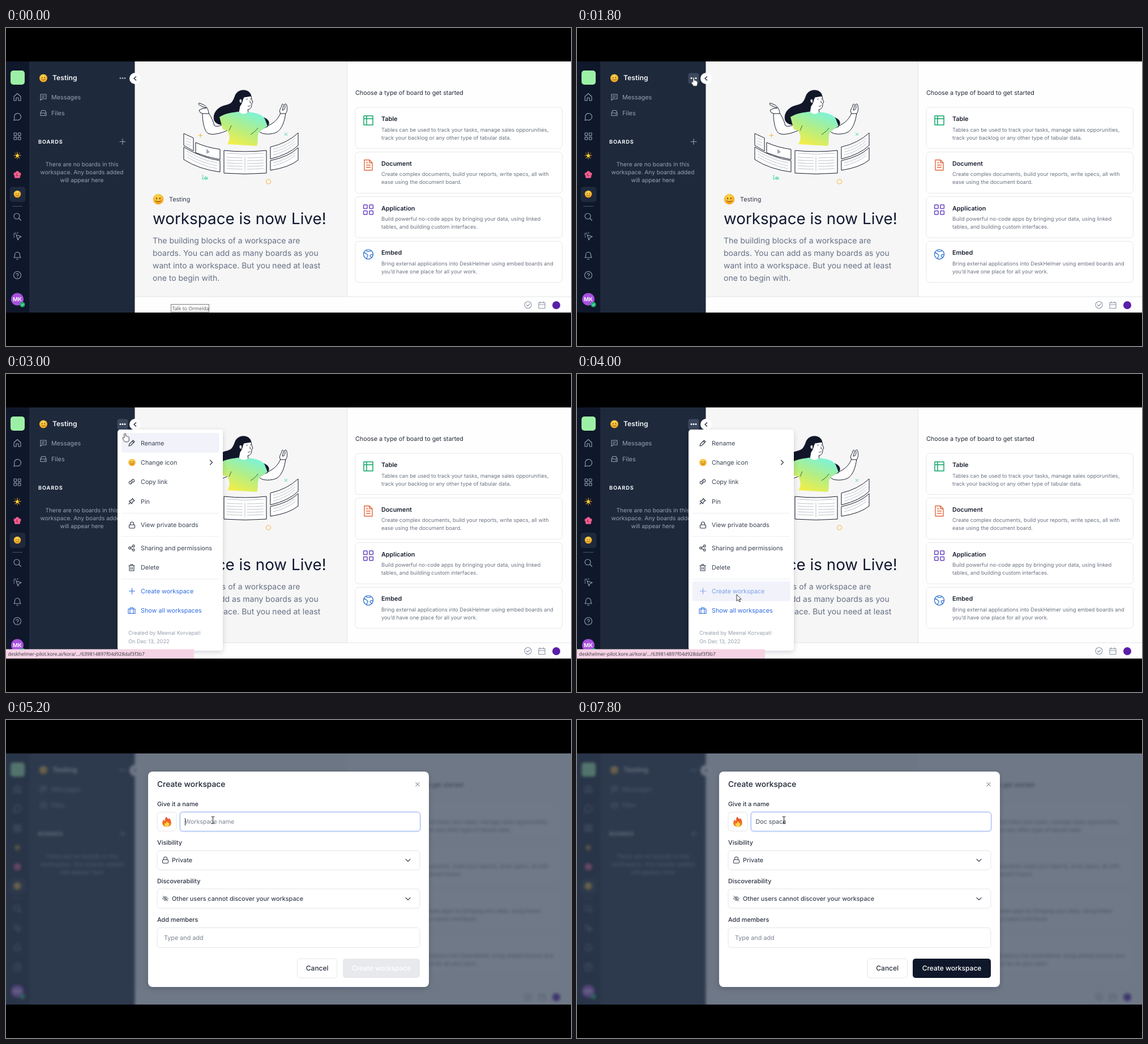
These frames come from a looping animation (998 px wide and 561 px high, 8000 ms). An HTML page:

```html
<!DOCTYPE html>
<html lang="en">
<head>
<meta charset="utf-8">
<title>Create a workspace</title>
<style>
html, body { margin: 0; width: 100%; height: 100%; overflow: hidden; background: #000; }
svg.stage { display: block; width: 100%; height: 100%; }
text { font-family: Inter, sans-serif; font-size: 10.8px; text-rendering: geometricPrecision; white-space: pre; }
.line { fill: none; stroke: currentColor; stroke-width: 1.1; stroke-linecap: round; stroke-linejoin: round; }
.solid { fill: currentColor; }
.ink { fill: #fff; stroke: #151a2b; stroke-width: 1; stroke-linejoin: round; }
.small { font-size: 9.3px; fill: #6b7280; }
.strong { font-weight: 600; fill: #1a2030; }
.lead { font-size: 14px; fill: #667085; }
.mid { text-anchor: middle; }
.system { font-family: "Open Sans", sans-serif; }
.field { fill: #fff; stroke: #e3e5e9; }

/* everything runs on one 8 s clock; 2.5% is one 200 ms step */
.tip, .dots, .menu, .hover, .pressed, .status, .page, .shade, .modal, .arrow, .hand, .beam,
.hint, .typed, .caret, .off, .on { animation: 8s step-end infinite; }
.tip { animation-name: tip; }
.dots { animation-name: dots; }
.menu { animation-name: menu; }
.hover { animation-name: hover; }
.pressed { animation-name: pressed; }
.status { animation-name: status; }
.page { animation-name: page; }
.shade, .modal, .beam { animation-name: modal; }
.pop { animation: pop 8s infinite; transform-origin: 499px 281px; }
.arrow { animation-name: arrow; }
.hand { animation-name: hand; }
.hint, .off { animation-name: before; }
.on { animation-name: after; }
.typed { animation-name: typed; }
.caret { animation-name: blink; }
.pointer { animation: pointer 8s infinite; }

@keyframes tip { 0% { opacity: 1 } 2.5%, 100% { opacity: 0 } }
@keyframes dots { 0% { opacity: 0 } 17.5% { opacity: 1 } 52.5%, 100% { opacity: 0 } }
@keyframes menu { 0% { opacity: 0 } 25% { opacity: 1 } 52.5%, 100% { opacity: 0 } }
@keyframes status { 0% { opacity: 0 } 25% { opacity: 1 } 55%, 100% { opacity: 0 } }
@keyframes modal { 0% { opacity: 0 } 52.5%, 100% { opacity: 1 } }
@keyframes page { 0% { filter: none } 52.5%, 100% { filter: blur(2.4px) } }
@keyframes pressed { 0% { opacity: 1 } 50% { opacity: .6 } 52.5%, 100% { opacity: 1 } }
@keyframes before { 0% { opacity: 1 } 72.5%, 100% { opacity: 0 } }
@keyframes after { 0% { opacity: 0 } 72.5%, 100% { opacity: 1 } }
@keyframes arrow { 0% { opacity: 0 } 2.5% { opacity: 1 } 17.5% { opacity: 0 } 50% { opacity: 1 } 52.5%, 100% { opacity: 0 } }
@keyframes hand { 0% { opacity: 0 } 17.5% { opacity: 1 } 50%, 100% { opacity: 0 } }
@keyframes blink { 0% { opacity: 1 } 70% { opacity: 0 } 72.5% { opacity: 1 } 97.5%, 100% { opacity: 0 } }
@keyframes hover {
  0% { transform: none } 40% { transform: translateY(34.5px) } 42.5% { transform: translateY(103px) }
  45% { transform: translateY(186px) } 47.5%, 100% { transform: translateY(262px) }
}
@keyframes typed {
  0% { transform: none } 72.5% { transform: translateX(7.8px) } 75% { transform: translateX(14.3px) }
  77.5% { transform: translateX(20.4px) } 80% { transform: translateX(23.4px) }
  85% { transform: translateX(29px) } 87.5% { transform: translateX(35.6px) }
  90% { transform: translateX(47.7px) } 92.5%, 100% { transform: translateX(54.2px) }
}
@keyframes pop {
  0%, 52.5% { transform: scale(.992); opacity: .975; animation-timing-function: ease-out }
  55%, 100% { transform: none; opacity: 1 }
}
@keyframes pointer {
  0%, 2.5% { transform: translate(300px, 494px); animation-timing-function: ease-out }
  15%, 35% { transform: translate(206px, 87.5px); animation-timing-function: ease-in-out }
  50%, 52.5% { transform: translate(282px, 389px); animation-timing-function: ease-in-out }
  65%, 100% { transform: translate(365.5px, 176.5px) }
}
</style>
</head>
<body>
<svg class="stage" viewBox="0 0 998 561">
<defs>
  <radialGradient id="gold" cx=".45" cy=".3" r=".75"><stop stop-color="#ffdc50"/><stop offset="1" stop-color="#f39b19"/></radialGradient>
  <linearGradient id="shirt" x1=".2" y1="1" x2=".75" y2="0"><stop offset=".05" stop-color="#f6ee45"/><stop offset=".5" stop-color="#b4ee83"/><stop offset="1" stop-color="#7af3dc"/></linearGradient>
  <linearGradient id="fire" x2="0" y2="1"><stop stop-color="#e8452c"/><stop offset="1" stop-color="#f98a1d"/></linearGradient>
  <filter id="soft" x="-20%" y="-20%" width="140%" height="140%"><feDropShadow dx="0" dy="3" stdDeviation="5" flood-color="#101828" flood-opacity=".16"/></filter>
  <g id="smile">
    <circle r="7" fill="url(#gold)"/>
    <g fill="#6b4413"><ellipse cx="-2.1" cy="-1.1" rx=".8" ry="1.2"/><ellipse cx="2.1" cy="-1.1" rx=".8" ry="1.2"/></g>
    <path d="M-3.2 2.300Q0 4.700 3.200 2.300" fill="none" stroke="#6b4413" stroke-width=".8" stroke-linecap="round"/>
  </g>
  <g id="grid" class="line">
    <rect x="-6" y="-6" width="4.6" height="4.6" rx=".6"/><rect x="1.4" y="-6" width="4.6" height="4.6" rx=".6"/>
    <rect x="-6" y="1.4" width="4.6" height="4.6" rx=".6"/><rect x="1.4" y="1.4" width="4.6" height="4.6" rx=".6"/>
  </g>
  <g id="lock" class="line"><rect x="-5" y="-1" width="10" height="6" rx="1.4"/><path d="M-3-1V-3A3 3 0 0 1 3-3V-1"/></g>
  <path id="chevron" class="line" d="M-4-2L0 2L4-2"/>
  <path id="plus" class="line" d="M-5 0H5M0-5V5"/>
  <rect id="card" x="617" y="140" width="365.5" height="72.5" rx="6" fill="#fff" stroke="#e7e8eb"/>
</defs>

<g class="page">
  <rect x="-20" y="40" width="61" height="490" fill="#0f172a"/>
  <rect x="41" y="40" width="187" height="490" fill="#1e293b"/>
  <rect x="227.500" y="40" width="375.500" height="434" fill="#f6f6f6"/>
  <rect x="603" y="40" width="420" height="434" fill="#fefefe"/>
  <rect x="227.500" y="474" width="800" height="60" fill="#fefefe"/>
  <path d="M602.5 40V474M228 474H1020" stroke="#e2e4e8" fill="none"/>

  <!-- rail -->
  <rect x="8" y="75" width="25" height="25" rx="5" fill="#9cf0a5"/>
  <rect x="6.500" y="280" width="28" height="27" rx="5" fill="#1e293b"/>
  <path d="M11 314.500H29" stroke="#475569"/>
  <g color="#94a3b8">
    <path class="line" transform="translate(20 122)" d="M-6-1L0-6.500L6-1V6H2V1H-2V6H-6Z"/>
    <path class="line" transform="translate(20 157)" d="M-6 6L-5 2A6 6 0 1 1-2 5Z"/>
    <use href="#grid" x="20" y="191"/>
    <path class="line" transform="translate(20 333)" d="M-6-1A5 5 0 1 1 4-1A5 5 0 1 1-6-1M3 3L6.500 6.500"/>
    <path class="line" transform="translate(20 367)" d="M-2-2L7 1L3 3L1 7ZM-3-6V-4M-7-2H-5M-6-5L-5-4M0-5L1-6M-6 2L-5 1"/>
    <path class="line" transform="translate(20 402)" d="M-6 3C-4 1-4.500-1-4.500-2A4.500 4.500 0 0 1 4.500-2C4.500-1 4 1 6 3ZM-1.500 6H1.500"/>
    <g transform="translate(20 436)"><circle class="line" r="6.500"/><path class="line" d="M-2-1.500A2 2 0 1 1 0 1V1.300M0 3.600V3.700"/></g>
  </g>
  <g transform="translate(20 225)"><path d="M0-4.500L1.300-1.500L4.500-1.200L2 1L3 4.200L0 2.500L-3 4.200L-2 1L-4.500-1.200L-1.300-1.500Z" fill="#ffd02a"/><path d="M0-6.500V-4M0 4V6.500M-6.500 0H-4M4 0H6.500M-4.500-5L-3-3.300M4.500-5L3-3.300M-4.500 5L-3 3.300M4.500 5L3 3.300" stroke="#f5a623"/></g>
  <g transform="translate(20 259)" fill="#ee5a92">
    <circle cy="-3.700" r="3"/><circle cx="3.500" cy="-1.200" r="3"/><circle cx="2.200" cy="3" r="3"/><circle cx="-2.200" cy="3" r="3"/><circle cx="-3.500" cy="-1.200" r="3"/>
    <circle r="2" fill="#a7264c"/><circle cx="1" cy="-.5" r="1" fill="#ffd34d"/>
  </g>
  <use href="#smile" transform="translate(20 293) scale(.9)"/>
  <circle cx="20" cy="478.500" r="11" fill="#a750dc"/>
  <text x="20" y="482" class="mid" font-weight="600" style="font-size:9.800px" fill="#fff">MK</text>
  <circle cx="29" cy="488" r="4.600" fill="#17b26a"/>
  <path d="M27 488L28.500 489.500L31 486.700" fill="none" stroke="#fff"/>

  <!-- side panel -->
  <use href="#smile" x="66" y="88.500"/>
  <text x="82" y="92.300" font-weight="600" style="font-size:12.200px" fill="#f4f6f9">Testing</text>
  <g color="#94a3b8">
    <g transform="translate(206 88.500)" class="solid"><circle cx="-4" r="1.500"/><circle r="1.500"/><circle cx="4" r="1.500"/></g>
    <path class="line" transform="translate(66 122)" d="M-5-5H5V3H-2L-5 5.500ZM-2.500-2H2.500M-2.500.5H1"/>
    <path class="line" transform="translate(66 150)" d="M-5 0L-3-4.500H3L5 0V4.500H-5ZM-5 0H5M2 2.300H3"/>
    <use href="#plus" x="206" y="200.500"/>
    <g class="solid">
      <text x="80" y="125.500">Messages</text><text x="80" y="153.700">Files</text>
      <g class="mid"><text x="134" y="243.700" style="font-size:10.200px">There are no boards in this</text><text x="134" y="257.700" style="font-size:10.200px">workspace. Any boards added</text><text x="134" y="271.700" style="font-size:10.200px">will appear here</text></g>
    </g>
  </g>
  <text x="57" y="204" font-weight="700" letter-spacing=".9" style="font-size:9.200px" fill="#f1f4f8">BOARDS</text>
  <g class="dots">
    <rect x="196.500" y="79.500" width="19" height="19" rx="4" fill="#3b475c"/>
    <g transform="translate(206 88.500)" fill="#fff"><circle cx="-4" r="1.500"/><circle r="1.500"/><circle cx="4" r="1.500"/></g>
  </g>
  <circle cx="228" cy="89" r="10" fill="#fff"/>
  <path d="M230 85.500L226 89L230 92.500" fill="none" stroke="#1a2030" stroke-width="1.300"/>

  <!-- illustration -->
  <g class="ink">
    <path d="M314 186L331 194V217L314 207ZM335 202Q355 211 378 214V232Q355 228 335 220ZM314 210Q345 229 378 234V254Q340 249 314 232Z"/>
    <path d="M467 210Q497 203 516 185V207Q500 223 467 231ZM467 234Q500 227 516 211V233Q500 246 467 251Z"/>
    <path d="M347 150C347 165 350 182 357 186C366 190 382 185 392 180L384 170C377 174 370 174 368 172C366 164 362 156 358 150"/>
    <path d="M358 151C358 145 355 139 350 136L342 132.500Q339 132 341 135.500L348 139L354 141L347 142L341 145Q342 150 347 151Z"/>
    <path d="M485 150C481 160 474 168 461 173L447 182C452 189 470 188 478 184C488 178 492 164 494 150"/>
    <path d="M485 151C481 145 486 142 487 137C487 133 491 133 490 138L488 145C493 145 494 139 492 135Q495 132 496 137C497 142 497 147 494 151Z"/>
    <path d="M433 121C432 107 410 106 405 119C400 133 397 134 386 137C371 141 365 153 368 163C373 173 388 172 396 164C404 158 411 154 414 146L421 122Z" fill="#111629"/>
    <path d="M420 122C417 128 417 134 413 138L411 149Q420 157 428 149L427 144C433 143 434 139 434 133L436 131L434 126L433 120Z"/>
    <path d="M416 126Q412 124 412 129Q413 133 416 132" stroke-width=".8"/>
    <path d="M424 126L427 125M431 125L433 125M427 138Q430 139 432 136M431 128V132L433 132" fill="none" stroke-width=".8"/>
    <path d="M455 158C463 161 467 166 462 174L454 177Z" fill="#111629"/>
    <path d="M377 157C388 150 401 149 411 147.500Q419 155 428 148.500C440 149 452 152 457 160L462 173L448 182C442 190 447 199 443 208L391 205C397 196 395 187 390 180L383 179Z" fill="url(#shirt)" stroke="none"/>
    <path d="M432 188C438 184 443 180 445 176M394 181L398 172" fill="none" stroke-width=".7"/>
    <path d="M385 216Q422 220 460 216V256Q422 259 385 256Z"/>
  </g>
  <g fill="none" stroke="#a9adb6" stroke-width=".75">
    <path d="M390 221Q422 224 455 221M422 227V252M390 228Q405 229 418 229M390 233Q405 234 418 234M390 238Q405 239 418 239M390 243Q405 244 418 244M390 248Q405 249 418 249M426 229Q440 229 455 228M426 234Q440 234 455 233M426 239Q440 239 455 238M426 244Q440 244 455 243M426 249Q440 249 455 248"/>
    <path d="M319 217Q344 233 373 238M319 222Q344 238 373 243M319 227Q344 243 373 248M318 194L327 198M318 199L327 203M318 204L327 208"/>
    <path d="M472 214Q496 208 511 194M472 219Q496 213 511 199M472 224Q496 218 511 204M472 238Q496 232 511 220M472 243Q496 237 511 225"/>
  </g>
  <path d="M354 213L360 219L354 222Z" fill="#a5a8af"/>
  <g fill="none" stroke="#f6b545" stroke-width="1.100"><path d="M340 189.500H347M343.500 186V193"/><circle cx="463.500" cy="271" r="4"/></g>
  <path d="M492 185L497 190M497 185L492 190M346 260Q350 259 347 264Q346 269 350 266Q354 259 351 266Q354 269 356 264Q353 261 353 266H357" fill="none" stroke="#35d3a3" stroke-width="1"/>

  <use href="#smile" transform="translate(269 302) scale(1.330)"/>
  <text x="288" y="305.700" fill="#30384a">Testing</text>
  <text x="259" y="346" style="font-size:27.800px" fill="#111830">workspace is now Live!</text>
  <text class="lead" x="259" y="380">The building blocks of a workspace are</text>
  <text class="lead" x="259" y="402">boards. You can add as many boards as you</text>
  <text class="lead" x="259" y="423.700">want into a workspace. But you need at least</text>
  <text class="lead" x="259" y="445.500">one to begin with.</text>

  <!-- board types -->
  <text x="617" y="118" style="font-size:10.750px" fill="#242a38">Choose a type of board to get started</text>
  <g>
    <use href="#card"/>
    <path class="line" color="#12a66a" style="stroke-width:1.500" transform="translate(640 163)" d="M-8-8H8V8H-8ZM-8-3H8M-3-8V8"/>
    <text class="strong" x="663" y="164">Table</text>
    <text class="small" x="663" y="182.500">Tables can be used to track your tasks, manage sales opporunities,</text>
    <text class="small" x="663" y="196.500">track your backlog or any other type of tabular data.</text>
  </g>
  <g transform="translate(0 78.800)">
    <use href="#card"/>
    <path class="line" color="#e2683c" style="stroke-width:1.400" transform="translate(640 163)" d="M-7-9H2L7-4V9H-7ZM2-9V-4H7M-3.500 0H3.500M-3.500 4H3.500M-3.500-4H-1"/>
    <text class="strong" x="663" y="164">Document</text>
    <text class="small" x="663" y="182.500">Create complex documents, build your reports, write specs, all with</text>
    <text class="small" x="663" y="196.500">ease using the document board.</text>
  </g>
  <g transform="translate(0 157.500)">
    <use href="#card"/>
    <use href="#grid" color="#6b46c1" transform="translate(640 163) scale(1.400)"/>
    <text class="strong" x="663" y="164">Application</text>
    <text class="small" x="663" y="182.500">Build powerful no-code apps by bringing your data, using linked</text>
    <text class="small" x="663" y="196.500">tables, and building custom interfaces.</text>
  </g>
  <g transform="translate(0 236.300)">
    <use href="#card"/>
    <g color="#3174cf" transform="translate(640 163)"><circle class="line" r="8.500" style="stroke-width:1.300"/><path class="line" style="stroke-width:1.300" d="M-8-2.500C-3-3-4 0-1 1C0 3-3 4-3 8M-4-7C-2-3 2-5 5-6.500M8.500 1C4-1 2 2 4 4L6 6"/></g>
    <text class="strong" x="663" y="164">Embed</text>
    <text class="small" x="663" y="182.500">Bring external applications into DeskHelmer using embed boards and</text>
    <text class="small" x="663" y="196.500">you’d have one place for all your work.</text>
  </g>
  <g color="#8a93a5">
    <g transform="translate(922 488.500)"><circle class="line" r="6"/><path class="line" d="M-2.500 0L-.5 2L3-1.700"/></g>
    <path class="line" transform="translate(946.500 489)" d="M-5.500-4.500H5.500V5.500H-5.500ZM-5.500-1H5.500M-3-6.500V-4M3-6.500V-4"/>
  </g>
  <circle cx="972" cy="489" r="7" fill="#5a1fa8"/>
</g>

<g class="tip">
  <rect x="291.500" y="487.500" width="67" height="13.500" fill="#fff" stroke="#7b7b7b"/>
  <text class="system" x="293.500" y="497.500" style="font-size:8.800px" fill="#555">Talk to Ormelda</text>
</g>

<g class="menu">
  <rect x="197" y="98" width="186" height="390" rx="5" fill="#fff" filter="url(#soft)"/>
  <rect class="hover" x="204" y="104" width="172.500" height="34.500" rx="3" fill="#f1f2fa"/>
  <path d="M204 245.500H376M204 286.500H376M204 361.500H376" stroke="#eceef1"/>
  <g color="#2b3344">
    <path class="line" transform="translate(222 122)" d="M-5 5L-4 1.500L2.500-5L5-2.500L-1.500 4ZM1-3.500L3.500-1"/>
    <use href="#smile" transform="translate(222.500 156) scale(.9)"/>
    <use href="#chevron" transform="translate(362.500 156) rotate(-90)"/>
    <path class="line" transform="translate(222 190)" d="M-1 1.500A2.500 2.500 0 0 1-1-1.500L1.500-4A2.500 2.500 0 0 1 4.500-.5L3 1M1-1.500A2.500 2.500 0 0 1 1 1.500L-1.500 4A2.500 2.500 0 0 1-4.500.5L-3-1"/>
    <path class="line" transform="translate(222 224.500)" d="M1-5L5-1L3.500-.5L1 2L.5 4.500L-4.500-.5L-2-1L.5-3.500ZM-2 2L-5 5"/>
    <use href="#lock" x="222.500" y="267"/>
    <g transform="translate(222 307)" class="line"><circle cx="-3.500" r="1.900"/><circle cx="3.300" cy="-3.500" r="1.900"/><circle cx="3.300" cy="3.500" r="1.900"/><path d="M-1.800-1L1.700-2.700M-1.800 1L1.700 2.700"/></g>
    <path class="line" transform="translate(222 341.500)" d="M-5-3.500H5M-4-3.500V5.500H4V-3.500M-1.800-3.500V-5.500H1.800V-3.500M-1.300-.5V3M1.300-.5V3"/>
    <g fill="#3b4354">
      <text x="238" y="125.500">Rename</text><text x="238" y="160">Change icon</text><text x="238" y="194">Copy link</text>
      <text x="238" y="228.500">Pin</text><text x="238" y="270">View private boards</text>
      <text x="238" y="311">Sharing and permissions</text><text x="238" y="345.300">Delete</text>
    </g>
  </g>
  <g color="#2e6be0">
    <g class="pressed"><use href="#plus" x="222.500" y="383"/><text class="solid" x="238" y="387">Create workspace</text></g>
    <path class="line" transform="translate(222 417.500)" d="M-6-3H6V5H-6ZM-3-3V5M3-3V5M-2.500-3V-5.500H2.500V-3"/>
    <text class="solid" x="238" y="421.300">Show all workspaces</text>
  </g>
  <g fill="#98a0ae"><text x="216" y="459.500" style="font-size:9.300px">Created by Meenal Korvapati</text><text x="216" y="475" style="font-size:9.300px">On Dec 13, 2022</text></g>
</g>

<rect class="shade" y="59" width="998" height="443" fill="#344054" fill-opacity=".7"/>

<g class="modal"><g class="pop">
  <rect x="251" y="91" width="496" height="380" rx="8" fill="#fff" filter="url(#soft)"/>
  <text x="267" y="118.300" style="font-size:13.800px" font-weight="500" fill="#1d2433">Create workspace</text>
  <path d="M723.500 110L730.500 117M730.500 110L723.500 117" stroke="#596171"/>
  <g font-weight="500" fill="#2a3140"><text x="267" y="152">Give it a name</text><text x="267" y="220">Visibility</text><text x="267" y="287.500">Discoverability</text><text x="267" y="355.500">Add members</text></g>
  <rect class="field" x="267" y="162.500" width="34" height="33.500" rx="5"/>
  <g transform="translate(284 179.500)"><path d="M-1-9C1-5 4-4 5-6C8-1 9 3 6 7Q0 11-6 7C-9 3-8-1-5-4Q-4-1-3-1C-3-4-3-6-1-9Z" fill="url(#fire)"/><path d="M0-1C1 2 3 1 4 3C5 7 2 8.500 0 8.500C-4 8-5 5-3 2Q-2 4-1 3Q-1 1 0-1Z" fill="#ffd84a"/></g>
  <rect x="307" y="162.500" width="424.500" height="34" rx="5" fill="none" stroke="#e2eafc" stroke-width="3"/>
  <rect x="307.500" y="162.500" width="424" height="33.500" rx="5" fill="#fff" stroke="#9db7f0"/>
  <text x="315.600" y="183" style="font-size:10.700px" fill="#414958">Doc space</text>
  <g class="typed"><rect x="316" y="170" width="62" height="18" fill="#fff"/><path class="caret" d="M316.500 173V186" stroke="#1d2433"/></g>
  <text class="hint" x="316" y="183" style="font-size:10.600px" fill="#7c8391">Workspace name</text>
  <rect class="field" x="267" y="230.500" width="464" height="34" rx="5"/>
  <rect class="field" x="267" y="298" width="464" height="34" rx="5"/>
  <rect class="field" x="267" y="366.500" width="464" height="35" rx="5"/>
  <g color="#3a4252">
    <use href="#lock" x="281.500" y="247.500"/><use href="#chevron" x="710" y="247.500"/><use href="#chevron" x="710" y="315.500"/>
    <path class="line" style="stroke-width:.9" transform="translate(281.500 315)" d="M-5 0Q0-7 5 0Q0 7-5 0M-1.700 0A1.700 1.700 0 1 1 1.700 0A1.700 1.700 0 1 1-1.700 0M-4.500-4.500L4.500 4.500"/>
    <g class="solid" font-weight="500"><text x="293" y="251.200">Private</text><text x="293" y="318.800">Other users cannot discover your workspace</text></g>
  </g>
  <text x="279" y="387.500" fill="#7c8391">Type and add</text>
  <g font-weight="500">
    <g class="off">
      <rect class="field" x="514.500" y="421" width="70.500" height="34" rx="5"/><text class="mid" x="549.700" y="442.300" style="font-size:12px" fill="#2a3140">Cancel</text>
      <rect x="595" y="421" width="136" height="34" rx="5" fill="#e8e9ec"/><text class="mid" x="663" y="442.300" style="font-size:12px" fill="#fff">Create workspace</text>
    </g>
    <g class="on">
      <rect x="512" y="419.500" width="220" height="37" fill="#fff"/>
      <rect class="field" x="513" y="421" width="70.500" height="34" rx="5"/><text class="mid" x="548.200" y="442.300" style="font-size:12px" fill="#2a3140">Cancel</text>
      <rect x="593" y="421" width="138" height="34" rx="5" fill="#0f172a"/><text class="mid" x="662" y="442.300" style="font-size:12px" fill="#fff">Create workspace</text>
    </g>
  </g>
</g></g>

<g class="status">
  <rect y="485.500" width="332" height="16.500" fill="#f5d3e4"/>
  <text class="system" x="3.500" y="496.800" style="font-size:8.500px" fill="#33303a">deskhelmer-pilot.kore.ai/kora/.../639814897f04d928daf3f3b7</text>
</g>

<g class="pointer">
  <path class="arrow" d="M0 0V11.500L2.700 9L4.700 13L6.500 12.200L4.600 8.300H8.200Z" fill="#fff" stroke="#222" stroke-width=".9"/>
  <path class="hand" d="M-1.300 8V1Q0-1 1.300 1V5Q3 4 3.600 5.600Q5 5 5.500 6.400Q7 6 7 7.800V10.500Q7 13 5.500 15H-.5Q-2 12.500-4 9.500Q-4.500 7.300-2.600 7.500Z" fill="#fff" stroke="#222" stroke-width=".9" stroke-linejoin="round"/>
  <path class="beam" d="M-3-6H-1Q0-6 0-5V5Q0 6 1 6H3M3-6H1Q0-6 0-5M-3 6H-1Q0 6 0 5" fill="none" stroke="#222" stroke-width="1.100"/>
</g>

<path d="M0 0H998V59H0ZM0 502H998V561H0Z" fill="#000"/>
</svg>
</body>
</html>
```
